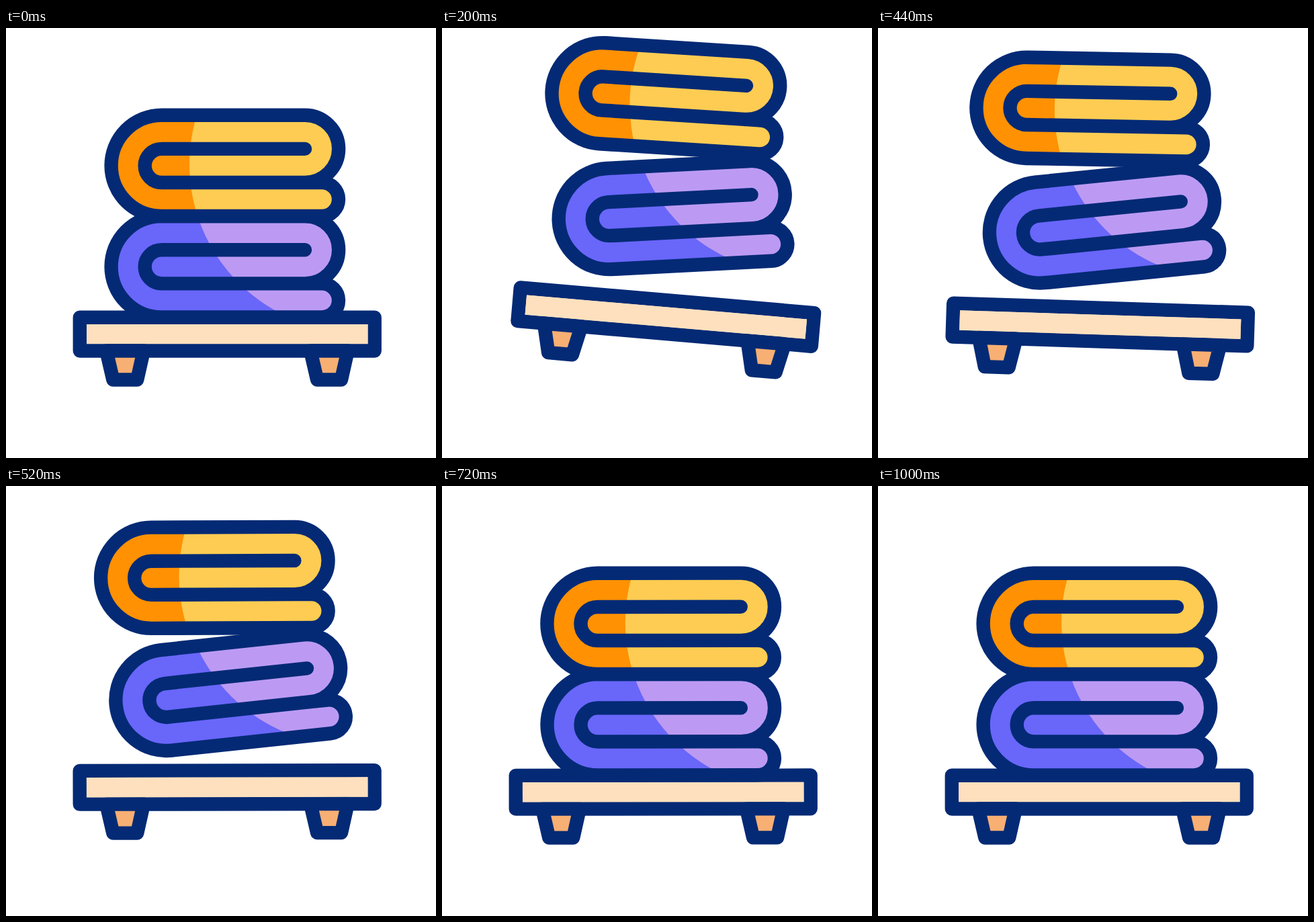
These frames come from a looping animation (640x640 px, 1.42 s). An HTML page:

```html
<!DOCTYPE html>
<html lang="en">
<head>
<meta charset="utf-8">
<title>Folded towels</title>
<style>
html, body { margin: 0; width: 100%; height: 100%; overflow: hidden; background: #fff; }
svg { display: block; width: 100%; height: 100%; }
.line { fill: none; stroke: #042a75; stroke-width: 20.4; stroke-linecap: round; stroke-linejoin: round; }
</style>
</head>
<body>
<svg viewBox="0 0 640 640">
  <defs>
    <path id="fold" d="M231.7 129.7H445A50 50 0 0 1 445 230H470A25 25 0 0 1 470 280H231.7A75 75 0 0 1 231.7 129.7ZM445 230H231.7A25 25 0 0 1 231.7 179.9H445"/>
    <path id="foot" d="M149.3 480.5L159.3 523.5H195.2L204.9 480.5Z"/>
    <clipPath id="light"><circle cx="522" cy="203" r="249"/></clipPath>
  </defs>
  <g id="board">
    <rect x="109.8" y="430.7" width="438.9" height="49.8" fill="#fee0be"/>
    <rect x="109.8" y="430.7" width="438.9" height="49.8" class="line"/>
    <g fill="#f8af73"><use href="#foot"/><use href="#foot" x="303.8"/></g>
    <g class="line"><use href="#foot"/><use href="#foot" x="303.8"/></g>
    <path d="M120 455.5H538.5" stroke="#fee0be" stroke-width="29.2"/>
  </g>
  <g id="lower">
    <use href="#fold" y="150.4" fill="#6966fa"/>
    <g clip-path="url(#light)"><use href="#fold" y="150.4" fill="#bc9af3"/></g>
    <use href="#fold" y="150.4" class="line"/>
  </g>
  <g id="upper">
    <use href="#fold" fill="#ff9102"/>
    <g clip-path="url(#light)"><use href="#fold" fill="#fecc52"/></g>
    <use href="#fold" class="line"/>
  </g>
</svg>
<script>
const LOOP = 1420, STEP = 20, LEVEL = 517, LANDED = 720, REST = 1000;
const PIVOT = "329.25 503";
const beats = [0, 80, 200, 360, 520, LANDED];

// Kicked up to a peak, then falling freely until it lands.
function hop(t, peak, apex, land, ease) {
  if (t < apex) return peak * Math.sin(Math.PI / 2 * (t / apex) ** ease);
  return peak * Math.max(0, 1 - ((t - apex) / (land - apex)) ** 2);
}

// Rocking of the board that fades out after it has swung back.
function wobble(t) {
  if (t < LEVEL || t > REST) return 0;
  return -2.1 * Math.sin(Math.PI * (t - LEVEL) / 205) * (REST - t) / (REST - LEVEL);
}

// Smooth curve from 0 through one value per beat and back to 0.
function drift(t, ...inner) {
  if (t >= LANDED) return 0;
  const v = [0, ...inner, 0];
  const gap = i => beats[i + 1] - beats[i];
  const rate = i => (v[i + 1] - v[i]) / gap(i);
  const slope = i => i === 0 || i === v.length - 1 ? 0
    : (rate(i - 1) * gap(i) + rate(i) * gap(i - 1)) / (gap(i) + gap(i - 1));
  const i = beats.findIndex(b => b > t) - 1;
  const u = (t - beats[i]) / gap(i), w = 1 - u;
  return w * w * (1 + 2 * u) * v[i] + u * u * (3 - 2 * u) * v[i + 1]
    + gap(i) * u * w * (w * slope(i) - u * slope(i + 1));
}

function place(id, transform) {
  document.getElementById(id).setAttribute("transform", transform);
}

function draw(now) {
  const t = Math.floor(now % LOOP / STEP) * STEP;
  const rock = wobble(t);
  const ride = t < LANDED ? "" : `rotate(${rock} ${PIVOT})`;
  const high = hop(t, 108, 210, LANDED, 1.17);
  const low = Math.min(high, hop(t, 71.4, 177, 667, 0.81));

  place("board", `translate(0 ${-hop(t, 26.6, 110, 590, 1.56)})
    rotate(${hop(t, 5.1, 126, LEVEL, 1.04) + rock} ${PIVOT})`);
  place("lower", `${ride} translate(${drift(t, 23.8, 17.1, 11.8, 6.8)} ${-low})
    rotate(${drift(t, -0.9, -2.96, -4.6, -6.1)} 231.7 355.3)`);
  place("upper", `${ride} translate(${drift(t, 21.5, 6.9, -2.5, -15.5)} ${-high})
    rotate(${drift(t, -0.9, 3.65, 2.45, -0.2)} 231.7 204.9)`);
  requestAnimationFrame(draw);
}
draw(0);
</script>
</body>
</html>
```
